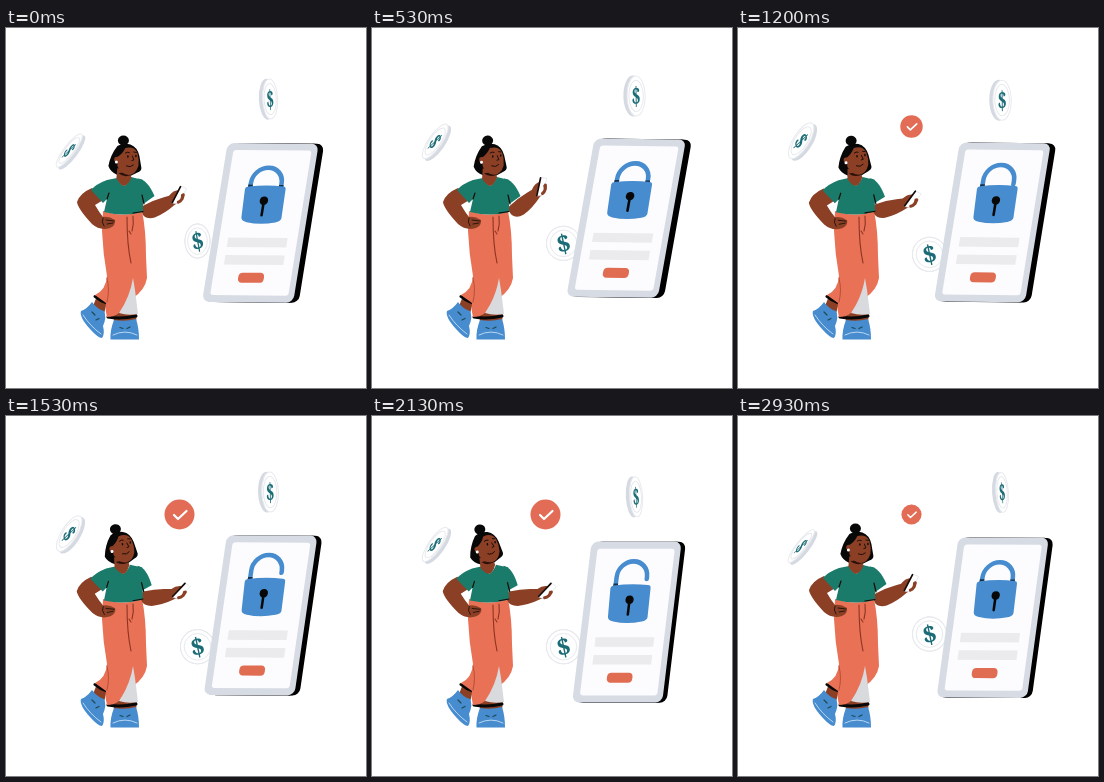
Animation of 360 by 360 pixels, one loop 3 s. Source, as an HTML page:

```html
<!DOCTYPE html>
<html lang="en">
<head>
<meta charset="utf-8">
<title>Secure payment</title>
<style>
  html, body { margin: 0; width: 100%; height: 100%; overflow: hidden; background: #fff; }
  svg { display: block; width: 100vw; height: 100vh; }
  .skin { fill: #8b4026; }
  .green { fill: #1a7b6a; }
  .coral { fill: #e97256; }
  .blue { fill: #468cce; }
  .line { fill: none; stroke-linecap: round; stroke-linejoin: round; }
  .ink { stroke: #150a08; }
  .coin text { font: 700 25px "Noto Serif", "DejaVu Serif", serif; fill: #1b6c76; text-anchor: middle; }
</style>
</head>
<body>
<svg viewBox="0 0 360 360">
  <g id="coins"></g>

  <g id="phone">
    <g id="edge"></g>
    <g id="front">
      <rect width="92" height="159" rx="7" fill="#d6dbe4"/>
      <rect x="7" y="7" width="79" height="145" rx="3" fill="#fcfcfe"/>
      <path id="shackle" class="line" stroke="#468cce" stroke-width="4.600"/>
      <path id="sockets" stroke="#15304d" stroke-width="4.600"/>
      <path class="blue" d="M25 46Q25 44 28 43.500Q46 41 63 43Q66 43 66 46L66.500 75Q66 78 61 79Q46 82 32 79Q26 78 26 74Z"/>
      <circle cx="46" cy="57.500" r="4.200" fill="#080808"/>
      <path class="line" d="M46 59V72" stroke="#080808" stroke-width="2.600"/>
      <rect x="16" y="94.500" width="60" height="9.500" fill="#ebebed"/>
      <rect x="16" y="112" width="60" height="9.500" fill="#ebebed"/>
      <rect x="32.500" y="129.500" width="26" height="10" rx="4" fill="#e06c52"/>
    </g>
  </g>

  <g id="badge">
    <circle r="15" fill="#e26c55"/>
    <path class="line" d="M-5.500 .5L-1.500 4.500L7 -3.500" stroke="#fff" stroke-width="2.200"/>
  </g>

  <g id="legs">
    <path class="skin" d="M91 268L101 274L98 286L87 278Z"/>
    <path class="skin" d="M107 284H131L130 294H108Z"/>
    <path class="line" d="M89 268.500Q94 273 101 275M102 289Q115 291.500 130 288" stroke="#080808" stroke-width="3"/>
    <path class="blue" d="M86 274Q81 281 75 283Q73 289 84 301Q92 310 96 310Q99 306 97 298Q101 289 98 283Q91 281 86 274Z"/>
    <path class="line" d="M77 287Q84 298 95 306" stroke="#b9d6f2" stroke-width="1"/>
    <path class="line" d="M86 284L89 287M90 292L93 290.500" stroke="#1d4a52" stroke-width="1.200"/>
    <path class="blue" d="M108 292Q119 294 130 291Q133 300 133 311.500H104.500Q104 302 108 292Z"/>
    <path class="line" d="M107 307Q119 301 131 307" stroke="#b9d6f2" stroke-width="1"/>
    <path class="line" d="M114 299.500L117 300.500M121 300.500L124 299" stroke="#1d4a52" stroke-width="1.200"/>
    <path class="coral" d="M97 183Q117 190 136 183Q140 202 140 228L141 250Q139 262 127 270L113 285Q108 289 101 289Q99 281 100 275L89 267Q100 262 101 248Q97 226 96 203Z"/>
    <path d="M127 250Q124 269 113 285Q122 288 132 286L129 262Z" fill="#d9dade"/>
    <path class="line" d="M121 189Q121 217 125 235M127 188Q128 196 126 203M123 203L125 206" stroke="#8c3422" stroke-width="1.100"/>
    <path class="line" d="M101 250Q104 262 101 274" stroke="#b84e35" stroke-width="1"/>
  </g>

  <g id="torso">
    <path class="skin" d="M86 160Q74 165 71 174Q72 181 86 196Q94 203 104 200Q110 197 109 192Q103 188 97 189Q93 184 89 177L99 171Z"/>
    <path class="line ink" d="M97 190Q95 194 98 198M101 196L107 195M100 192L108 193" stroke-width=".8"/>
    <g id="arm">
      <path class="skin" d="M-4 -8Q8 -8 18 -5.500L24 -4Q30 -7 36 -4Q38 0 36 4Q32 8 25 6.500Q12 9.500 1 8Q-7 6 -8 0Q-8 -6 -4 -8Z"/>
      <path d="M23 3.700L39 -6.800L43 -2L28 7.500Z" fill="#fff" stroke="#dfe1e6" stroke-width=".6"/>
      <path class="line ink" d="M23.500 3.500L38.500 -6.500" stroke-width="1.700"/>
      <path class="line" d="M29 6Q34 6.500 36 2M34 5L37 2" stroke="#8b4026" stroke-width="3"/>
    </g>
    <path class="green" d="M111 150L101 152Q90 156 85 162L97 175L101 171L98 184Q118 189 137 184L137 170L137 152L125 149Q122 156 118 158Q113 155 111 150Z"/>
    <path id="sleeve" class="green" d="M132 150.500Q141 151 148.500 168L138 175.500L132 168Z"/>
    <path class="line ink" d="M101 171L103 165M127 185L137 183.500M138 176L136 167" stroke-width="1.200"/>
    <g id="head">
      <path d="M112 118Q105 127 103 138Q105 144 112 147L123 149L132 144.500Q136 143 136 140L134 128Q132 119 125 116.500Q118 114.500 112 118Z" fill="#090808"/>
      <ellipse cx="118" cy="112.500" rx="5.500" ry="5" fill="#090808"/>
      <path class="skin" d="M112 140L125 145L126 150Q122 158 118 158Q113 155 111 150Z"/>
      <path d="M113 145Q118 150 126 147L125 144Z" fill="#2a0f0a"/>
      <path class="skin" d="M112 129Q117 126 120 120Q129 118 132 125Q134 132 133 138Q130 147 123 147Q115 146 112 138Z"/>
      <circle class="skin" cx="111.500" cy="131.500" r="2.700"/>
      <circle cx="111" cy="134" r="1.500" fill="#fff"/>
      <path class="line ink" d="M120 125Q122 123.500 124 124.500M128.500 124L131 124.500M127 128L128.500 132L126.500 132.500M121 138Q125 140 128 137" stroke-width=".9"/>
      <path class="line ink" d="M122.500 128V129M130.500 127.500V128.500" stroke-width="1.500"/>
    </g>
  </g>
</svg>

<script>
const LOOP = 3000, WAVE = 3400, STEP = 1000 / 15;
const $ = id => document.getElementById(id);
const set = (el, name, value) => el.setAttribute(name, value);
const move = (el, value) => set(el, "transform", value);
const mix = (a, b, k) => a + (b - a) * k;
const wave = (t, peak) => Math.cos(2 * Math.PI * (t - peak) / WAVE);

// Eased value from [time, value] steps
function track(keys, t) {
  let i = 1;
  while (i < keys.length - 1 && t > keys[i][0]) i++;
  const [t0, a] = keys[i - 1], [t1, b] = keys[i];
  const k = Math.min(1, Math.max(0, (t - t0) / (t1 - t0)));
  return mix(a, b, k * k * (3 - 2 * k));
}

const ARM = [[0, -29], [70, -29], [260, -49], [470, -49], [670, -29], [1050, -29], [1330, -13], [2650, -13], [2880, -29]];
const HEAD = [[0, 0], [70, 0], [260, -3], [470, -3], [670, 0], [1050, 0], [1330, -7.500], [2130, -10], [2650, -9], [2880, 0]];
const LIFT = [[70, 0], [260, 1], [470, 1], [670, 0]];
const LEAN = [[1050, 0], [1330, 1], [2650, 1], [2880, 0]];
const OPEN = [[1080, 0], [1330, 1], [2680, 1], [2880, 0]];
const BADGE = [[1080, 0], [1270, 1.08], [1400, 1], [2870, 1], [3035, 0]];

// Phone corners (top left, top right, bottom left) at its highest and lowest
const HIGH = [222.500, 110.3, 314, 111.500, 194.300, 268.500];
const LOW = [219.500, 126, 309.500, 126, 200.300, 287];

const coins = [
  { x: 64.500, y: t => 122.500 - 10.500 * wave(t, 900), w: t => 8.500 + 1.500 * wave(t, 1300),
    h: 21, turn: w => 38 - (w - 7) * 2, side: 1, spin: 25 },
  { x: 262.500, y: t => 74.500 - 6.500 * wave(t, 550), w: t => 9.800 + 1.700 * wave(t, 900),
    h: 20.500, turn: w => w - 12, side: -1, spin: 0 },
  { x: 191.500, y: t => 222.500 - 9.700 * wave(t, 130), w: t => track([[0, 13], [330, 17.500]], t),
    h: 17.500, turn: () => 0, side: 0, spin: -12 }
];

function addShape(parent, tag, attrs) {
  const el = document.createElementNS("http://www.w3.org/2000/svg", tag);
  for (const name in attrs) set(el, name, attrs[name]);
  return parent.appendChild(el);
}

for (const c of coins) {
  c.el = addShape($("coins"), "g", { class: "coin" });
  c.rim = addShape(c.el, "ellipse", { fill: "#d5d9e2" });
  c.face = addShape(c.el, "ellipse", { fill: "#fff", stroke: "#e8eaee", "stroke-width": 1 });
  c.ring = addShape(c.el, "ellipse", { fill: "none", stroke: "#e8e9ed", "stroke-width": 1 });
  c.sign = addShape(c.el, "text", { y: 9 });
  c.sign.textContent = "$";
}
const edges = [1, 0.5].map(k => ({ k, el: addShape($("edge"), "rect", { width: 92, height: 159, rx: 7, fill: "#000" }) }));

function drawCoin(c, t) {
  const w = c.w(t), shift = 1.600 * c.side, rx = w - Math.abs(shift);
  move(c.el, `translate(${c.x} ${c.y(t)}) rotate(${c.turn(w)})`);
  const oval = (el, cx, a, b) => { set(el, "cx", cx); set(el, "rx", a); set(el, "ry", b); };
  oval(c.rim, shift, rx, c.h);
  oval(c.face, -shift, rx - .5, c.h - .5);
  oval(c.ring, -shift, rx * .76, c.h * .76);
  move(c.sign, `translate(${-shift} 0) scale(${Math.min(1, rx / 15)} 1) rotate(${c.spin})`);
}

function drawPhone(t) {
  const k = (1 - wave(t, 615)) / 2;
  const [x, y, rx, ry, bx, by] = HIGH.map((v, i) => mix(v, LOW[i], k));
  const axes = [(rx - x) / 92, (ry - y) / 92, (bx - x) / 159, (by - y) / 159].join(" ");
  const place = (el, dx, dy) => move(el, `matrix(${axes} ${x + dx} ${y + dy})`);
  const depth = mix(6, 4.300, k);
  place($("front"), 0, 0);
  for (const e of edges) place(e.el, depth * e.k, .2 * e.k);

  const open = track(OPEN, t);
  set($("shackle"), "d", `M30 45V${40 - 5 * open}a15.500 15.500 0 0 1 31 0V${45 - 8 * open}`);
  set($("sockets"), "d", "M30 41.500V45" + (open < .1 ? "M61 41.500V45" : ""));
}

function drawPerson(t) {
  const arm = track(ARM, t), head = track(HEAD, t), lift = track(LIFT, t), lean = track(LEAN, t);
  move($("torso"), `rotate(${-1.500 * lean} 118 186)`);
  move($("arm"), `translate(${144 + 2 * lift - lean} ${183 - 2 * lift}) rotate(${arm + 1.500 * lean})`);
  move($("sleeve"), `rotate(${9 * lean} 134 154)`);
  move($("head"), `translate(${head * .1 - .6} 0) rotate(${head} 119 151)`);
}

function draw(time) {
  const t = Math.floor((time % LOOP + 4) / STEP) * STEP % LOOP;
  coins.forEach(c => drawCoin(c, t));
  drawPhone(t);
  drawPerson(t);
  move($("badge"), `translate(173.500 98.500) scale(${track(BADGE, t)})`);
}

const start = performance.now();
function tick() {
  draw(performance.now() - start);
  requestAnimationFrame(tick);
}
tick();
</script>
</body>
</html>
```
